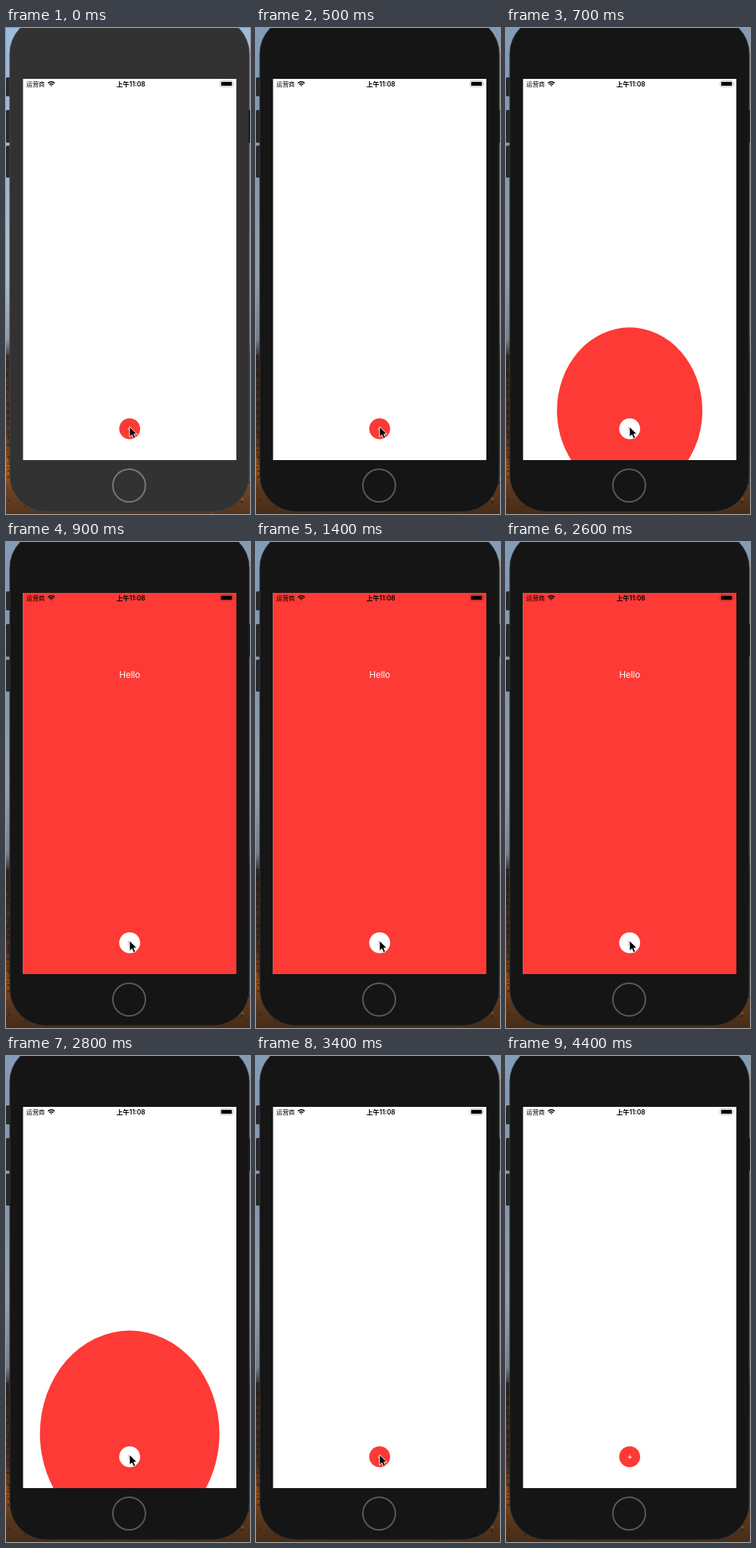
An HTML page for the animation above (4500 ms loop, 322 px wide and 640 px high).

```html
<!DOCTYPE html>
<html lang="zh">
<head>
<meta charset="utf-8">
<title>Circle reveal</title>
<style>
  html, body { margin: 0; width: 100%; height: 100%; overflow: hidden; background: #151515; }
  svg { display: block; }
  text { font-family: Inter, "Noto Sans CJK SC", "Noto Sans CJK", sans-serif; }
  #phone { fill: #151515; stroke: #353535; }
  #ring { fill: none; stroke: #585858; stroke-width: 2; }
  .bright #phone { fill: #323232; stroke: #444; }
  .bright #ring { stroke: #777; }
  .bright #shade { opacity: 0; }
</style>
</head>
<body>
<svg id="stage" width="322" height="640" viewBox="0 0 322 640">
  <defs>
    <linearGradient id="sky" x2="0" y2="1">
      <stop offset="0" stop-color="#9dbbdd"/>
      <stop offset=".3" stop-color="#9fb5cf"/>
      <stop offset=".5" stop-color="#b3c0cd"/>
      <stop offset=".64" stop-color="#8f9ba8"/>
      <stop offset=".68" stop-color="#3a302d"/>
      <stop offset=".84" stop-color="#54382a"/>
      <stop offset=".9" stop-color="#b85d1c"/>
      <stop offset=".95" stop-color="#6e4220"/>
      <stop offset="1" stop-color="#54361e"/>
    </linearGradient>
    <clipPath id="screen"><rect x="22.5" y="67" width="281.5" height="502"/></clipPath>
    <clipPath id="reveal"><ellipse id="hole" cx="163.2"/></clipPath>
  </defs>

  <rect width="322" height="640" fill="url(#sky)"/>
  <g id="leaves"></g>
  <rect id="shade" width="322" height="640" opacity=".17"/>

  <g fill="#26282b">
    <rect x="0" y="65" width="8" height="25" rx="1.5"/>
    <rect x="0" y="108" width="8" height="43" rx="1.5"/>
    <rect x="0" y="155" width="8" height="42" rx="1.5"/>
  </g>
  <rect id="phone" x="5" y="-14" width="316" height="651" rx="48"/>
  <rect x="320" y="108" width="2" height="43" fill="#1b1c1e"/>
  <circle id="ring" cx="162.5" cy="602.5" r="21.5"/>

  <g clip-path="url(#screen)">
    <rect x="22" y="67" width="283" height="502" fill="#fff"/>
    <circle cx="163.2" cy="527.7" r="13.8" fill="#fd3a35"/>
    <path d="M160.7 528.2h5.4M163.4 525.5v5.4" stroke="#fff" stroke-width=".9"/>
    <g id="page" clip-path="url(#reveal)">
      <rect x="22" y="67" width="283" height="502" fill="#fd3a35"/>
      <text x="163.3" y="179" font-size="11.5" fill="#fff" text-anchor="middle">Hello</text>
      <circle cx="163.2" cy="527.7" r="13.8" fill="#fff"/>
      <path d="M161.2 526l4 4.4m0-4.4l-4 4.4" stroke="#555" stroke-width=".8"/>
    </g>

    <text x="26.7" y="77" font-size="8.2">运营商</text>
    <g fill="none" stroke="#000" stroke-width="1.5">
      <path d="M55.4 72.6q4.4-3.7 8.8 0M57.2 74.5q2.6-2 5.2 0"/>
      <path d="M58.4 75.5h2.8l-1.4 1.5z" fill="#000" stroke="none"/>
    </g>
    <text x="164.8" y="76.9" font-size="8.5" font-weight="600" text-anchor="middle">上午11:08</text>
    <rect x="282.8" y="69.8" width="16.4" height="7.4" rx="1.7" fill="none" stroke="#000" stroke-opacity=".45" stroke-width=".7"/>
    <rect x="284" y="71" width="14" height="5" rx=".8"/>
    <path d="M300 72.3q1.3 1.2 0 2.4z" opacity=".5"/>
  </g>

  <path id="cursor" d="M0 0V13.6L3.2 10.7L5.4 15.6L7.8 14.5L5.7 9.8H9.9Z" stroke="#fff" stroke-width=".9"/>
</svg>
<script>
const $ = id => document.getElementById(id);
const LOOP = 4500, OPEN = 650, CLOSE = 2566, SPAN = 300;
const clamp = v => Math.min(1, Math.max(0, v));
const ramp = (t, start, length) => clamp((t - start) / length);
const smooth = v => v * v * (3 - 2 * v);

// Seeded foliage behind the phone's lower corners
let seed = 7;
const random = () => (seed = seed * 16807 % 2147483647) / 2147483647;
const tints = ['#2b2320', '#3d2c22', '#c8691c', '#7a4a22'];
let leaves = '';
for (let i = 0; i < 170; i++) {
  const y = 430 + random() * 210;
  const x = random() * (y > 590 ? 50 : 6);
  const side = y > 590 && random() > .5 ? 320 - x : x;
  const tint = tints[Math.floor(random() * (y > 560 ? 4 : 2))];
  leaves += `<rect x="${side}" y="${y}" width="3" height="3" fill="${tint}" opacity=".6"/>`;
}
$('leaves').innerHTML = leaves;

function draw(t) {
  $('stage').classList.toggle('bright', t < 100);

  const p = ramp(t, OPEN, SPAN) - ramp(t, CLOSE, SPAN);
  const hole = $('hole');
  hole.setAttribute('rx', 14 + 482 * p);
  hole.setAttribute('ry', 14 + 562 * p);
  hole.setAttribute('cy', 527.7 - 140 * p);
  $('page').style.display = p > 0 ? '' : 'none';

  const drift = smooth(ramp(t, 1500, 300)) - smooth(ramp(t, 2100, 300));
  $('cursor').setAttribute('transform', `translate(${163 + 2 * drift} ${525 - 2 * drift})`);
  $('cursor').style.display = t < 4000 ? '' : 'none';
}

function tick() {
  draw(performance.now() % LOOP);
  requestAnimationFrame(tick);
}
tick();
</script>
</body>
</html>
```
